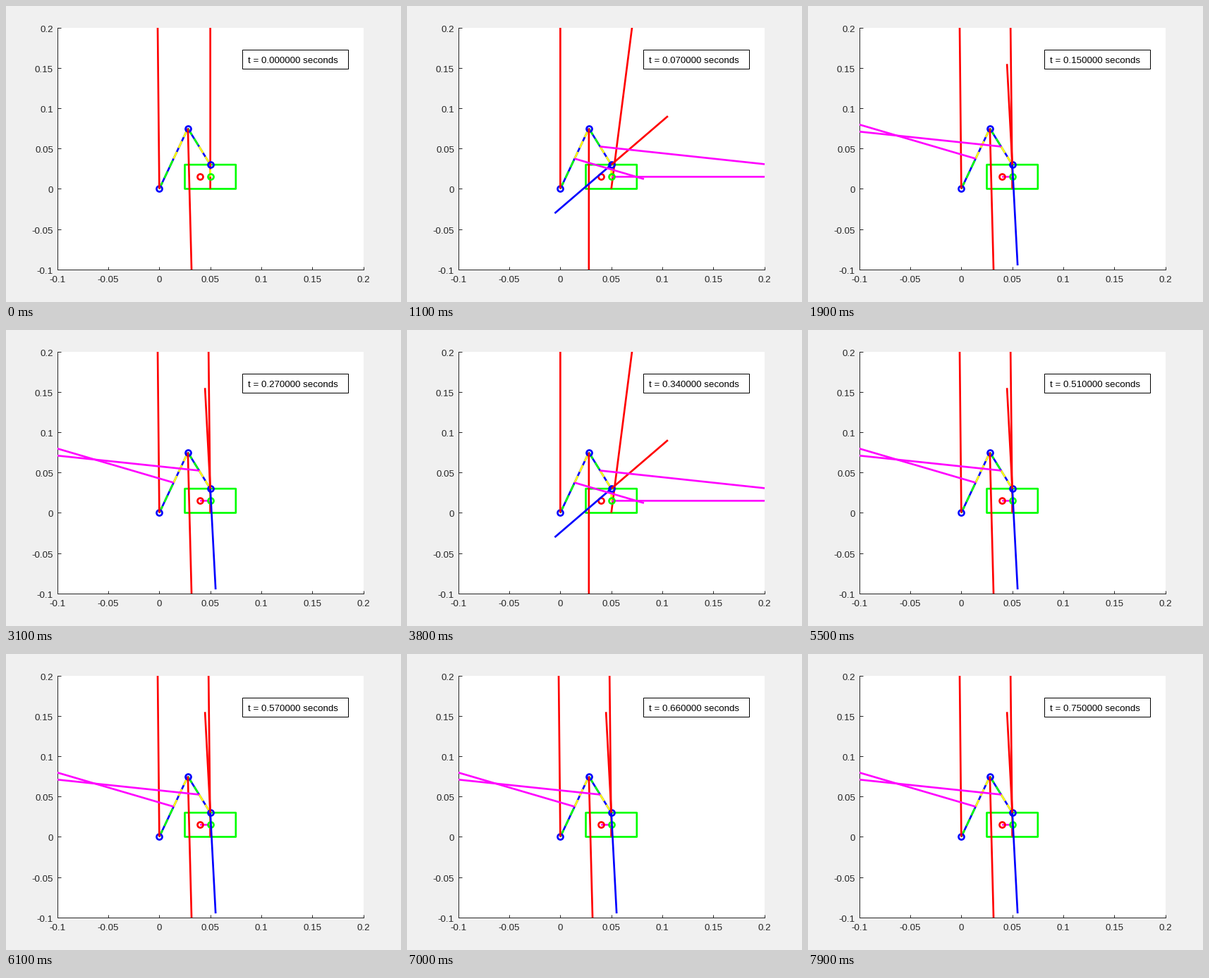
These frames come from a looping animation (560x420 px, 8000 ms). A matplotlib script:

```python
import matplotlib.pyplot as plt
from matplotlib.animation import FuncAnimation
from matplotlib.patches import Rectangle

W, H, DPI = 560, 420, 100
PX = 72 / DPI                      # points per pixel
X0, X1, Y0, Y1 = 72.8, 506.5, 373.8, 30.8
LO, HI = -0.1, 0.2
LW = 2.67 * PX
INK = "#262626"
RED, GREEN, BLUE = "#ff0000", "#00ff00", "#0000ff"
YELLOW, MAGENTA = "#ffff00", "#ff00ff"

plt.rcParams["font.family"] = "Liberation Sans"
plt.rcParams["font.size"] = 13.33 * PX

fig = plt.figure(figsize=(W / DPI, H / DPI), dpi=DPI, facecolor="#f0f0f0")
ax = fig.add_axes([X0 / W, 1 - Y0 / H, (X1 - X0) / W, (Y0 - Y1) / H])
ax.set(xlim=(LO, HI), ylim=(LO, HI), facecolor="white")
for side in ("top", "right"):
    ax.spines[side].set_visible(False)
for side in ("left", "bottom"):
    ax.spines[side].set(linewidth=PX, color=INK)
ticks = [LO + 0.05 * i for i in range(7)]
ax.set_xticks(ticks)
ax.set_yticks(ticks)
ax.tick_params(direction="in", length=4.5 * PX, width=PX, color=INK,
               labelbottom=False, labelleft=False)


def label(x, y, text, color=INK, ha="center"):
    return fig.text(x / W, 1 - y / H, text, color=color, ha=ha,
                    va="baseline", zorder=20)


for v in ticks:
    name = f"{round(v, 2) + 0.0:g}"
    part = (v - LO) / (HI - LO)
    label(X0 + part * (X1 - X0), 392.5, name)
    label(67, Y0 + part * (Y1 - Y0) + 6, name, ha="right")


def line(p, q, color, z, **kw):
    return ax.plot([p[0], q[0]], [p[1], q[1]], color=color, lw=LW, zorder=z,
                   solid_capstyle="butt", snap=False, **kw)[0]


def ring(p, color, z):
    ax.plot(*p, "o", ms=8 * PX, mfc="none", mec=color, mew=LW, zorder=z,
            snap=False)


def mid(p, q):
    return (p[0] + q[0]) / 2, (p[1] + q[1]) / 2


hip, knee, ankle = (0, 0), (0.028, 0.075), (0.05, 0.03)
heel, foot, mark = (0.05, 0), (0.05, 0.015), (0.04, 0.015)
thigh, shank = mid(hip, knee), mid(knee, ankle)
dash = dict(dashes=(4, 2.3), dash_capstyle="butt")

# leg and foot
ax.add_patch(Rectangle((0.025, 0), 0.05, 0.03, fill=False, ec=GREEN, lw=LW,
                       joinstyle="round", snap=False, zorder=3))
for a, m, b in ((hip, thigh, knee), (knee, shank, ankle)):
    line(a, b, BLUE, 3)
    line(a, m, GREEN, 4, **dash)
    line(m, b, YELLOW, 4, **dash)
line(foot, ankle, YELLOW, 6, **dash)
for joint in (hip, knee, ankle):
    ring(joint, BLUE, 5)
ring(foot, GREEN, 6)
ring(mark, RED, 6)

# (start, colour, layer, end at rest, end when sticking, end when sliding)
VECTORS = [
    (hip, RED, 7, (-0.0017, 0.21), (-0.0017, 0.21), (0, 0.21)),
    (knee, RED, 7, (0.0318, -0.11), (0.0318, -0.11), (0.028, -0.11)),
    (heel, RED, 4, (0.05, 0.21), (0.0482, 0.21), (0.0713, 0.21)),
    (ankle, RED, 7, ankle, (0.0448, 0.155), (0.1055, 0.0903)),
    (ankle, BLUE, 7, ankle, (0.0552, -0.095), (-0.0055, -0.0303)),
    (thigh, MAGENTA, 8, thigh, (-0.123, 0.0883), (0.082, 0.0122)),
    (shank, MAGENTA, 8, shank, (-0.12, 0.0737), (0.22, 0.028)),
    (foot, MAGENTA, 5, foot, mark, (0.22, 0.015)),
]
arms = [line(v[0], v[0], v[1], v[2]) for v in VECTORS]

fig.add_artist(Rectangle((335 / W, 1 - 89 / H), 150 / W, 27 / H, fc="white",
                         ec="black", lw=PX, zorder=15))
clock = label(343, 81, "", color="black", ha="left")


def draw(n):
    step = max(0, n - 4)
    if step == 0:
        state = 3
    else:
        state = 4 if step % 3 == 0 else 5
    for arm, v in zip(arms, VECTORS):
        end = v[state]
        arm.set_data([v[0][0], end[0]], [v[0][1], end[1]])
        arm.set_visible(end != v[0])
    clock.set_text(f"t = {step / 100:.6f} seconds")
    return arms + [clock]


anim = FuncAnimation(fig, draw, frames=80, interval=100, repeat=True,
                     repeat_delay=0, blit=False)
plt.show()
```
